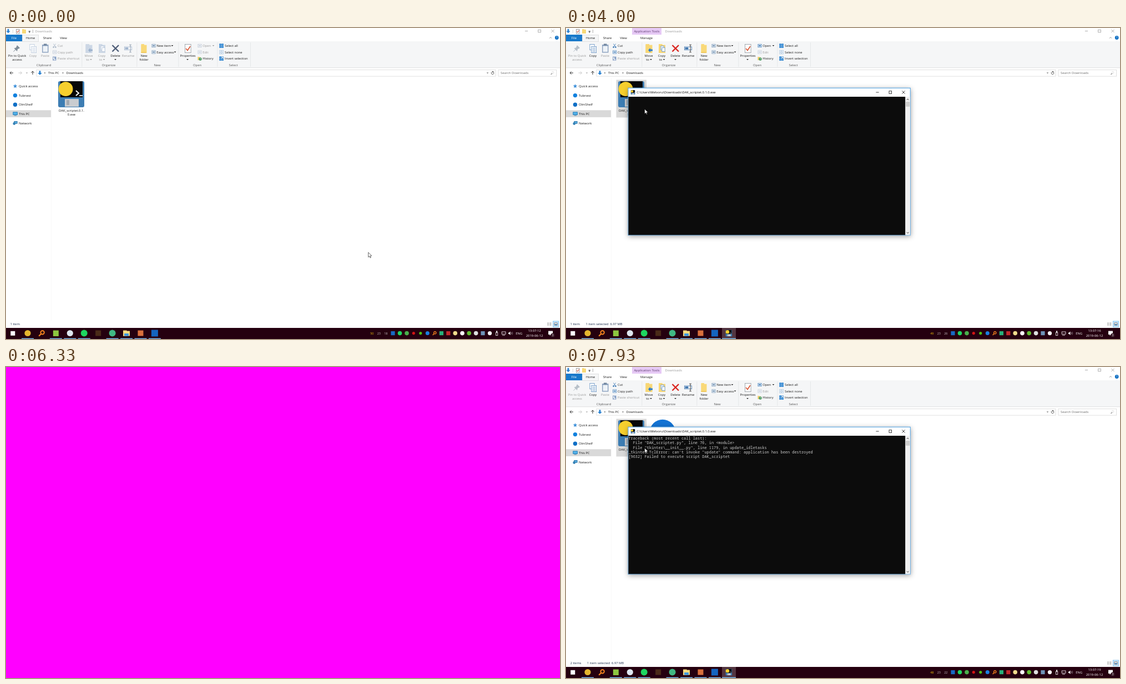
An HTML page with a canvas that plays this animation: 998 by 561 pixels, repeating every 8 s.

```html
<!DOCTYPE html>
<html lang="en">
<head>
<meta charset="utf-8">
<title>Downloads</title>
<style>
html, body { margin: 0; width: 100%; height: 100%; overflow: hidden; background: #fff; }
canvas { display: block; }
</style>
</head>
<body>
<canvas id="stage" width="998" height="561"></canvas>
<script>
const W = 998, H = 561, LOOP = 8000;
const c = document.getElementById('stage').getContext('2d');
const UI = '"Open Sans", "Noto Sans", sans-serif';
const MONO = '"Noto Sans Mono", "DejaVu Sans Mono", monospace';
const INK = '#1b1b1b', DIM = '#9a9a9a', BLUE = '#1979ca';

// ---- drawing helpers ----
function rect(x, y, w, h, fill, stroke) {
  if (fill) { c.fillStyle = fill; c.fillRect(x, y, w, h); }
  if (stroke) { c.strokeStyle = stroke; c.lineWidth = 0.8; c.strokeRect(x + 0.4, y + 0.4, w - 0.8, h - 0.8); }
}
function circ(x, y, r, fill) {
  c.fillStyle = fill;
  c.beginPath(); c.arc(x, y, r, 0, 7); c.fill();
}
function path(pts, close) {
  c.beginPath();
  for (let i = 0; i < pts.length; i += 2) c.lineTo(pts[i], pts[i + 1]);
  if (close) c.closePath();
}
function poly(pts, fill) { path(pts, true); c.fillStyle = fill; c.fill(); }
function line(pts, color, w = 0.8) {
  path(pts); c.strokeStyle = color; c.lineWidth = w; c.stroke();
}
function text(s, x, y, color = INK, align = 'left', size = 5.85) {
  c.font = size + 'px ' + UI;
  c.textAlign = align;
  c.fillStyle = color;
  c.fillText(s, x, y + size * 0.36);
}
const mid = (s, x, y, color, size) => text(s, x, y, color, 'center', size);
const drop = (x, y, color = INK) => poly([x - 1.8, y - 1, x + 1.8, y - 1, x, y + 1], color);
function chevron(x, y, dx, dy, color) {
  line([x - dx - dy, y - dy - dx, x + dx, y + dy, x - dx + dy, y - dy + dx], color);
}
function arrow(x, y, angle, color, w = 1) {
  c.save(); c.translate(x, y); c.rotate(angle);
  line([-3, 0, 3, 0], color, w);
  line([0.3, -2.6, 3, 0, 0.3, 2.6], color, w);
  c.restore();
}
function fatArrow(x, y, s, angle, color) {
  c.save(); c.translate(x, y); c.rotate(angle); c.scale(s, s);
  poly([-4, -1.5, 0, -1.5, 0, -4, 4, 0, 0, 4, 0, 1.5, -4, 1.5], color);
  c.restore();
}
function page(x, y, w, h, color) { rect(x, y, w, h, '#fff', color); }
function windowButtons(xs, y, color) {
  const [a, b, d] = xs;
  line([a - 2.6, y, a + 2.6, y], color);
  rect(b - 2.7, y - 2.7, 5.4, 5.4, null, color);
  line([d - 2.6, y - 2.6, d + 2.6, y + 2.6], color);
  line([d - 2.6, y + 2.6, d + 2.6, y - 2.6], color);
}

// ---- icons ----
function appIcon(x, y, s) {
  c.save(); c.translate(x, y); c.scale(s, s);
  c.fillStyle = '#3d7db3';
  c.beginPath(); c.roundRect(0, 1, 47, 47, 3); c.fill();
  rect(4, 1, 40, 29, '#080808');
  rect(12, 33, 25, 14, '#c9ccd0');
  rect(15, 35, 5, 9, '#a4a9b0');
  line([32, 18, 37, 22.5, 32, 27], '#fff', 2);
  line([38, 27, 44, 27], '#fff', 1.6);
  circ(13.5, 15, 13, '#f7cf2e');
  c.restore();
}
function copyIcon(x, y, on) {
  const k = on ? '#5d8cc0' : '#b5c5da';
  page(x - 6, y - 8, 9, 11, k);
  page(x - 3, y - 4, 9.5, 12, k);
  for (let i = 0; i < 4; i++) line([x - 1, y - 1 + i * 2.2, x + 4.5, y - 1 + i * 2.2], k, 0.7);
}
function folder(x, y, w, h, color) {
  rect(x, y, w * 0.55, h, color);
  rect(x, y + h * 0.1, w, h * 0.9, color);
}
function fileAction(x, label, on, isCopy) {
  folder(x - 5.5, 29, 12, 16, on ? '#f8d775' : '#ccd7e5');
  if (isCopy) { page(x - 2, 32, 6, 8, on ? '#5d8cc0' : '#aebfd5'); page(x, 35, 6, 8, on ? '#5d8cc0' : '#aebfd5'); }
  else fatArrow(x + 3, 40, 1, Math.PI, on ? '#2b7cd0' : '#9db2cd');
  const k = on ? INK : DIM;
  mid(label, x, 50, k);
  mid('to', x - 2, 57, k);
  drop(x + 4, 57, k);
}
function smallItem(x, y, label, on, tint, arrowX) {
  rect(x - 3.5, y - 3, 7, 6, '#fff', on ? tint : '#b9c4d2');
  rect(x - 2, y - 1, 4, 2, on ? tint : '#c9d2dd');
  text(label, x + 5.2, y, on ? INK : DIM);
  if (arrowX) drop(arrowX, y, on ? INK : DIM);
}

// ---- file manager ----
function titleBar(sel, active) {
  const k = active ? '#111' : '#999';
  fatArrow(4, 5.5, 0.95, Math.PI / 2, '#2b82d0');
  line([12.4, 3, 12.4, 9], '#aaa', 0.5);
  page(18, 2, 6.5, 8.5, '#8b8b8b');
  line([19.4, 6, 21, 8, 23.6, 4], '#d5452c', 1);
  folder(29, 2, 7, 8, '#f9d978');
  line([40.6, 5.4, 44, 5.4], '#333', 0.6);
  drop(42.3, 7.4);
  line([48.4, 3, 48.4, 9], '#777', 0.6);
  if (sel) {
    rect(119, 0, 53, 12, '#e6c9f5');
    mid('Application Tools', 145.5, 5.5, '#5b3a6e');
    mid('Manage', 145, 18);
  }
  text('Downloads', sel ? 178.5 : 52.5, 6, k);
  windowButtons([937.5, 961, 985], 5.5, k);
  rect(0, 12, 29, 12, BLUE);
  mid('File', 14.5, 18, '#fff');
  rect(29, 12, 30, 13, '#f5f6f7', '#dadbdc');
  mid('Home', 44, 18);
  mid('Share', 74.5, 18);
  mid('View', 103.5, 18);
  line([979, 18.6, 981, 16.6, 983, 18.6], '#777');
  circ(992.2, 17.5, 3.4, '#1572c4');
  mid('?', 992.2, 17.5, '#fff', 5);
}

function ribbon(sel) {
  const on = sel ? INK : DIM;
  rect(0, 24, W, 48, '#f5f6f7');
  rect(0, 71.4, W, 0.8, '#dadbdc');
  rect(29.8, 23, 28.4, 2, '#f5f6f7');
  for (const x of [136.5, 235.5, 310.5, 380.5, 440]) rect(x, 26, 0.7, 44, '#dfe1e3');
  [['Clipboard', 68], ['Organize', 185], ['New', 272.5], ['Open', 344.5], ['Select', 409.5]]
    .forEach(([s, x]) => mid(s, x, 67, '#555'));

  const pin = sel ? '#b7c0c9' : '#7f8d99';
  poly([20, 31, 25, 36, 23.5, 37, 21, 38, 20, 42, 14.5, 36.5, 18, 35.5], pin);
  line([17, 39, 13.5, 42.6], pin, 1);
  const pk = sel ? DIM : INK;
  mid('Pin to Quick', 20, 50, pk);
  mid('access', 20, 57, pk);
  copyIcon(48.5, 37, sel);
  mid('Copy', 48.5, 50, on);
  rect(65, 30, 11.5, 14.5, '#8fa5c2');
  rect(68, 28.5, 5.5, 3, '#71869f');
  rect(66.5, 32.5, 8.5, 10.5, '#eef3f8');
  mid('Paste', 70.5, 50, DIM);

  const cut = sel ? '#3a78b5' : '#aab8c8';
  line([85.5, 28.5, 89, 34], cut); line([89.5, 28.5, 86, 34], cut);
  circ(85.6, 34.6, 1.3, cut); circ(89.4, 34.6, 1.3, cut);
  text('Cut', 93, 32, on);
  smallItem(87.7, 43.5, 'Copy path', sel, '#4f86bd');
  page(84.3, 51.5, 6, 7, '#6a87b5');
  arrow(87.4, 55.5, -0.7, '#5579ad', 0.8);
  text('Paste shortcut', 93, 55, DIM);

  fileAction(149, 'Move', sel, false);
  fileAction(172.5, 'Copy', sel, true);
  const del = sel ? '#d9221c' : '#4d5c76';
  line([191.5, 31, 203, 42.5], del, 2.3);
  line([203, 31, 191.5, 42.5], del, 2.3);
  mid('Delete', 197, 50); drop(197, 57);
  const ren = sel ? '#3d74ad' : '#9fb3cc';
  rect(213, 33.5, 14, 6.5, '#fff', ren);
  rect(214.5, 35, 6, 3.5, ren);
  line([224, 30.5, 224, 43.5], sel ? '#333' : '#8595a8', 1);
  line([222, 30.2, 226, 30.2], sel ? '#333' : '#8595a8');
  line([222, 43.7, 226, 43.7], sel ? '#333' : '#8595a8');
  mid('Rename', 220, 50, on);

  folder(243.5, 29, 10, 16, '#f9d978');
  rect(243.5, 43.5, 9, 1.5, '#eec352');
  mid('New', 248.5, 50); mid('folder', 248.5, 57);
  smallItem(266, 32, 'New item', true, '#6d8fb2', 299.5);
  smallItem(266, 43.5, 'Easy access', true, '#6d8fb2', 304.5);

  page(322, 29, 11.5, 16, '#8d959d');
  line([324, 37, 327, 40.5, 332, 33], '#d9502e', 1.6);
  mid('Properties', 327.5, 50); drop(327, 57);
  smallItem(349, 32, 'Open', sel, '#3e7cb8', 373.5);
  smallItem(349, 43.5, 'Edit', false, '');
  folder(345.5, 52, 5, 6, '#f4d06f');
  circ(350, 56, 2.7, '#4c9a62');
  line([350, 54.4, 350, 56, 351.3, 56], '#fff', 0.6);
  text('History', 354.2, 55);

  ['Select all', 'Select none', 'Invert selection'].forEach((s, i) => {
    const y = 32 + i * 11.5;
    for (let q = 0; q < 4; q++) {
      const solid = i === 0 || (i === 2 && q !== 1);
      rect(384.4 + (q % 2) * 4, y - 3.6 + (q >> 1) * 4, 3.4, 3.4, solid ? '#4a9be0' : '#fff', i === 1 ? '#a8c3dd' : '#3a87cc');
    }
    text(s, 394, y);
  });
}

function addressBar() {
  arrow(10, 81, Math.PI, '#333');
  arrow(25.5, 81, 0, '#c9c9c9');
  chevron(37.5, 81, 0, 0.9, '#888');
  arrow(48, 81, -Math.PI / 2, '#333');
  rect(54.5, 75, 828, 12.5, '#fff', '#d9d9d9');
  fatArrow(61, 81, 0.95, Math.PI / 2, '#2b82d0');
  chevron(70, 81, 0.8, 0, '#444');
  text('This PC', 76, 81);
  chevron(102.5, 81, 0.8, 0, '#444');
  text('Downloads', 108.5, 81);
  chevron(867.5, 81, 0, 1, '#555');
  c.strokeStyle = '#444'; c.lineWidth = 0.8;
  c.beginPath(); c.arc(876.5, 81.3, 2.3, -0.6, 4.6); c.stroke();
  poly([876.3, 77.6, 879, 79, 876.3, 80.6], '#444');
  rect(886.5, 75, 105.5, 12.5, '#fff', '#d9d9d9');
  text('Search Downloads', 891, 81, '#6d6d6d');
  c.beginPath(); c.arc(985, 80.3, 1.9, 0, 7); c.stroke();
  line([983.6, 81.8, 981.6, 84], '#444', 1);
}

function sidebar() {
  rect(0, 148.3, 81, 12.6, '#d9d9d9');
  rect(81.2, 90, 0.6, 438, '#f3f3f3');
  ['Quick access', 'Tubnest', 'OlmShelf', 'This PC', 'Network']
    .forEach((s, i) => text(s, 23, 105 + i * 16.6));
  const star = [];
  for (let i = 0; i < 10; i++) {
    const r = i % 2 ? 1.7 : 4, a = i * Math.PI / 5 - Math.PI / 2;
    star.push(16.5 + r * Math.cos(a), 105 + r * Math.sin(a));
  }
  poly(star, '#3c8fd9');
  circ(16.5, 121.6, 3.7, '#1081de');
  circ(16.5, 138.2, 3.7, '#0f6fc6');
  rect(12.5, 151.5, 8.5, 5.5, '#52b2ea', '#2676ad');
  rect(14.5, 157.5, 4.5, 0.8, '#2676ad');
  rect(14.5, 168, 6, 4.6, '#5ab0e4', '#2d6c9a');
  circ(14.8, 172.5, 2.4, '#3682b5');
}

function files(s) {
  if (s.sel) rect(90.5, 93.5, 54.5, 68, s.active ? '#cce8ff' : '#d9d9d9');
  else if (s.hover) rect(90.5, 93.5, 54.5, 68, '#e5f3ff');
  appIcon(94, 95, 1);
  mid('DAK_scriptet.0.1.', 118, 148.5);
  mid('0.exe', 118, 156.3);
  if (s.two) circ(174, 118, 23.3, '#1273d4');
}

function statusBar(s) {
  const k = '#1e2f4d';
  text(s.two ? '2 items' : '1 item', 7.7, 534.3, k);
  if (s.sel) {
    const x = s.two ? 38 : 35.5;
    text('1 item selected', x, 534.3, k);
    text('6.97 MB', x + 44, 534.3, k);
  }
  for (let i = 0; i < 3; i++) {
    line([975, 532 + i * 2, 978, 532 + i * 2], '#777', 0.7);
    line([979, 532 + i * 2, 982.5, 532 + i * 2], '#777', 0.7);
  }
  rect(985, 528.6, 11, 11, '#cce8ff', '#7abcec');
  rect(987.5, 531.5, 6, 5, '#fff', '#555');
  rect(988.5, 534, 4, 1.8, '#3e7cb8');
}

// ---- console ----
const TRACE = [
  'Traceback (most recent call last):',
  '  File "DAK_scriptet.py", line 76, in <module>',
  '  File "tkinter\\__init__.py", line 1179, in update_idletasks',
  '_tkinter.TclError: can\'t invoke "update" command: application has been destroyed',
  '[9632] Failed to execute script DAK_scriptet'
];
function terminal(s) {
  c.save();
  const k = 0.9 + 0.1 * s.open;
  c.globalAlpha = s.open;
  c.translate(366, 241); c.scale(k, k); c.translate(-366, -241);
  c.shadowColor = 'rgba(0,0,0,.38)'; c.shadowBlur = 9; c.shadowOffsetY = 2;
  rect(112, 108, 508.5, 266, '#fff');
  c.shadowColor = 'transparent';
  rect(111.6, 107.8, 509, 266.4, '#fff', '#1883d7');
  rect(112.4, 124, 499, 249.4, '#0c0c0c');
  rect(611.4, 124, 8.6, 249.4, '#f0f0f0');
  rect(612, 133, 7.4, 8.8, '#cdcdcd');
  line([613.9, 129.8, 615.7, 128, 617.5, 129.8], '#333', 1);
  line([613.9, 368.4, 615.7, 370.2, 617.5, 368.4], '#333', 1);
  appIcon(116.7, 112, 0.165);
  text('C:\\Users\\Melvoru\\Downloads\\DAK_scriptet.0.1.0.exe', 127.3, 116, '#111');
  windowButtons([561, 584.3, 608], 116, '#111');
  c.font = '6.93px ' + MONO;
  c.textAlign = 'left';
  c.fillStyle = '#ccc';
  TRACE.slice(0, s.lines).forEach((l, i) => c.fillText(l, 112.4, 130.9 + i * 8.32));
  if (s.caret) rect(112.5, 131, 4.2, 1.6, '#ccc');
  c.restore();
}

// ---- taskbar ----
function magnifier(x, y, r) {
  c.strokeStyle = '#f5821f'; c.lineWidth = r * 0.5;
  c.beginPath(); c.arc(x + r * 0.3, y - r * 0.3, r * 0.8, 0, 7); c.stroke();
  line([x - r * 0.3, y + r * 0.3, x - r * 1.3, y + r * 1.3], '#f5821f', r * 0.55);
}
function taskbar(s) {
  rect(0, 541, W, 20, '#25000f');
  if (s.active) rect(204.3, 541, 25.4, 20, '#533540');
  if (s.open > 0) rect(281, 541, 25, 20, '#533540');
  const slot = i => 39 + i * 25.43;
  [0, 2, 3, 4, 6, 7, 8, 9].forEach(i => rect(slot(i) - 11, 559.6, 22, 1.4, '#76b9ed'));
  rect(8.3, 546.8, 8, 8, '#fff');
  circ(slot(0), 550.5, 5.6, '#e4b62e');
  magnifier(slot(1), 550.5, 4);
  rect(slot(2) - 5, 545.5, 10, 10.5, '#8cc63f');
  circ(slot(3), 550.5, 5.6, '#dfe8f2');
  circ(slot(4), 550.5, 6, '#1ed760');
  rect(slot(5) - 5, 545.5, 10, 10, '#4a2a18');
  circ(slot(6), 550.5, 6, '#41b883');
  folder(slot(7) - 6, 545.5, 12, 10, '#fbdc80');
  rect(slot(7) - 4, 551, 8, 4.5, '#3f9ae0');
  rect(slot(8) - 5, 545.5, 10, 10, '#d9703c');
  rect(slot(9) - 6, 544.5, 12, 12, '#1565c0');
  if (s.open > 0) {
    appIcon(slot(10) - 5.7, 544.5, 0.245);
    rect(281, 559.6, 25, 1.4, '#76b9ed');
  }
  s.temps.forEach((n, i) => mid(n, 659.3 + i * 12.5, 550.8, i ? '#c9c2c5' : '#f0c20c', 5.5));
  const dot = (x, k, r = 3.8) => circ(x, 550.6, r, k);
  const box = (x, k) => rect(x - 3.6, 547, 7.2, 7.2, k);
  box(697, '#1769c4');
  dot(709.5, '#1ed760');
  dot(722, '#49b04c');
  dot(734.3, '#d21414', 2.6);
  dot(746.8, '#4fc414', 2.6);
  dot(759.3, '#1a7fe0', 3.5);
  magnifier(772, 550.6, 2.6);
  box(784.4, '#27b07a');
  box(796.8, '#c3272b');
  dot(809.2, '#f1dc8c');
  dot(822, '#fff');
  dot(834.2, '#63c132');
  dot(846.6, '#dfdfdf');
  box(859, '#6f94b8');
  dot(871.5, '#fff', 3.6);
  rect(882, 549, 4.2, 5.8, null, '#fff'); rect(883, 546.4, 2.2, 2.4, '#fff');
  rect(892.8, 547.6, 7.6, 5, null, '#fff'); line([894, 554.2, 899, 554.2], '#fff');
  poly([905, 549.4, 906.5, 549.4, 908.5, 547.3, 908.5, 554, 906.5, 552, 905, 552], '#fff');
  line([910, 549, 910.8, 550.7, 910, 552.3], '#fff', 0.6);
  line([911.6, 547.8, 912.8, 550.7, 911.6, 553.5], '#aaa', 0.6);
  mid('ENG', 924.3, 550.6, '#fff');
  mid('13:07:' + s.sec, 952, 545.8, '#fff');
  mid('2019-06-12', 952, 555, '#fff');
  poly([977, 546.5, 985, 546.5, 985, 553, 981.5, 553, 979.5, 555, 979.5, 553, 977, 553], '#fff');
  circ(985, 554.2, 3.6, '#3a1c28');
  mid('3', 985, 554.3, '#fff', 5);
}

function pointer(x, y) {
  c.save(); c.translate(x, y);
  const p = [0, 0, 0, 8.6, 2, 6.8, 3.4, 9.8, 4.7, 9.2, 3.4, 6.3, 6, 6.1];
  poly(p, '#fff');
  path(p, true);
  c.strokeStyle = '#000'; c.lineWidth = 0.6; c.stroke();
  c.restore();
}

// ---- timeline ----
const FLASH = ['#f00', '#0f0', '#00f', '#ff0', '#0ff', '#f0f'];
const clamp = v => Math.max(0, Math.min(1, v));
const TEMPS = [[0, '50 23 18'], [1670, '49 23 19'], [2670, '50 23 22'], [3600, '50 23 26'], [3670, '49 23 26'], [5000, '48 23 22']];

function draw(t) {
  const tick = Math.floor((t + 4) * 0.015);
  if (tick >= 78 && tick < 114) {
    rect(0, 0, W, H, FLASH[Math.min(tick, 112) % 6]);
    return;
  }
  const go = clamp((t - 30) / 740), e = go * go * (3 - 2 * go);
  const s = {
    sel: t >= 1000,
    hover: t >= 660,
    active: t >= 790 && t < 1330,
    open: clamp((t - 1300) / 220),
    two: t >= 5200,
    lines: t >= 7795 ? 5 : t >= 7730 ? 4 : 0,
    caret: t >= 2330 && t < 5000 && Math.floor((t - 2330 + 4) / 533.3) % 2 === 0,
    sec: 12 + Math.floor(t / 1000),
    temps: TEMPS.filter(r => t >= r[0]).pop()[1].split(' ')
  };
  rect(0, 0, W, H, '#fff');
  ribbon(s.sel);
  titleBar(s.sel, s.active);
  addressBar();
  sidebar();
  files(s);
  statusBar(s);
  if (s.open > 0) terminal(s);
  taskbar(s);
  pointer(652.7 - 511 * e, 404.8 - 258.6 * e);

  const out = clamp((t - 7560) / 200);
  if (t >= 7590 && out < 1) {
    c.globalAlpha = 1 - out;
    const k = 1 - 0.1 * out;
    rect(W * (1 - k) / 2, H * (1 - k) / 2, W * k, H * k, FLASH[112 % 6]);
    c.globalAlpha = 1;
  }
}

const start = performance.now();
function frame() {
  draw((performance.now() - start) % LOOP);
  requestAnimationFrame(frame);
}
frame();
</script>
</body>
</html>
```
